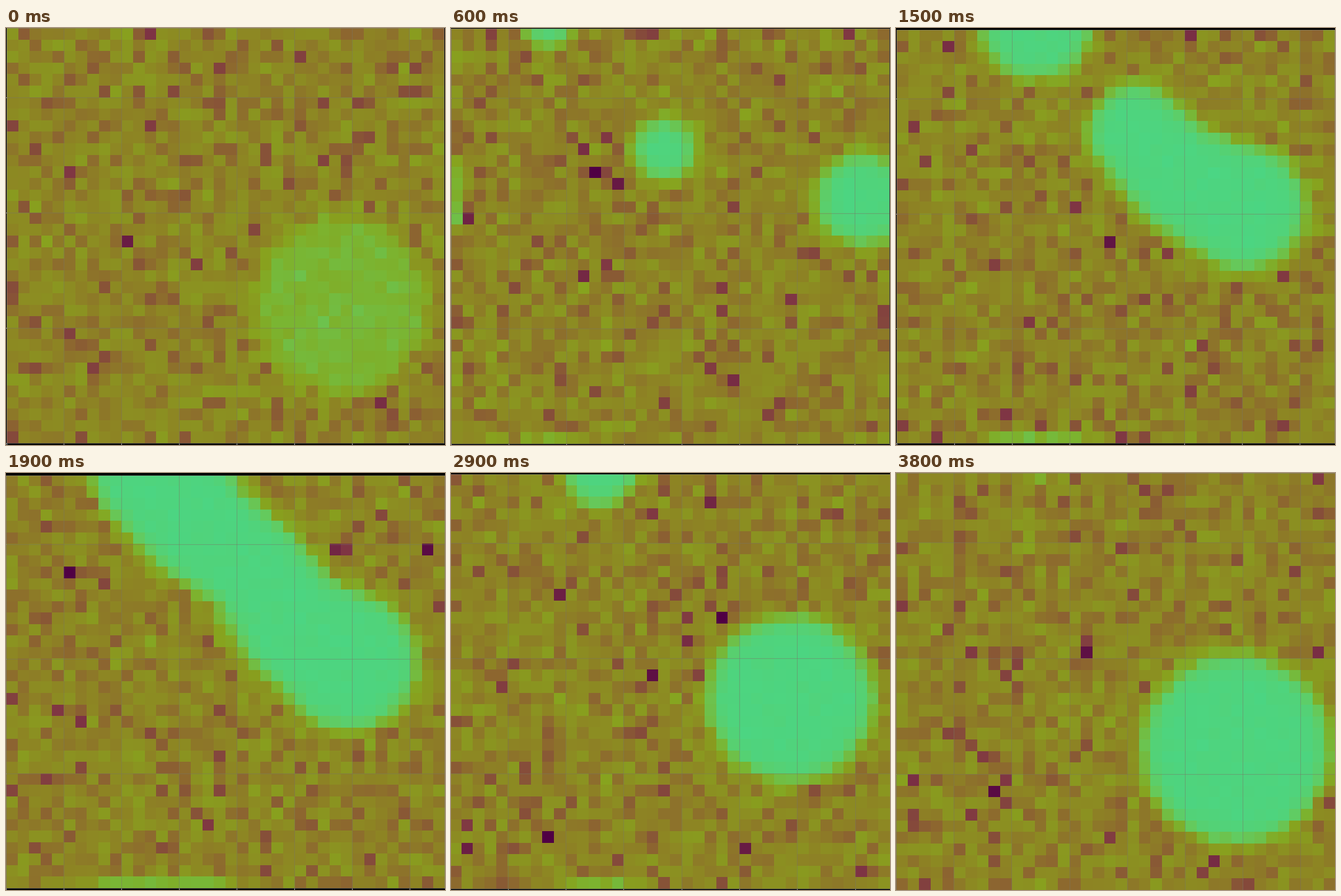
Recreate the animation shown at these times as a matplotlib script. Size 708x673 px, loop 3.9 s.

```python
import numpy as np
import matplotlib.pyplot as plt
from matplotlib.animation import FuncAnimation
from matplotlib.colors import LinearSegmentedColormap

W, H, DPI = 708, 673, 100
COLS, ROWS = 38, 36
FRAMES, STEP_MS = 39, 100
SPLIT = 6         # frame at which the opening disc has become separate drops
SAG = np.array([-0.7, 0.8])
LEAK = 0.25

# Colour against log10 of signal power.
STOPS = [
    (-3.3, (80, 0, 68)), (-2.2, (128, 54, 68)), (-1.0, (141, 102, 48)),
    (-0.15, (142, 132, 36)), (0.8, (136, 163, 30)), (1.4, (124, 180, 48)),
    (2.0, (100, 203, 95)), (2.7, (75, 214, 132)),
]
LOW, HIGH = STOPS[0][0], STOPS[-1][0]
CMAP = LinearSegmentedColormap.from_list(
    "power",
    [((v - LOW) / (HIGH - LOW), tuple(c / 255 for c in rgb)) for v, rgb in STOPS],
    N=512)

X, Y = np.meshgrid(np.arange(COLS) + 0.5, np.arange(ROWS) + 0.5)


def lerp(a, b, k):
    return a + (b - a) * k


def ease(t, start, end):
    k = np.clip((t - start) / (end - start), 0, 1)
    return k * k * (3 - 2 * k)


def capsule(a, b):
    """Soft mask of a capsule between two drops (x, y, radius)."""
    dx, dy, dr = b - a
    s = np.clip(((X - a[0]) * dx + (Y - a[1]) * dy) / (dx * dx + dy * dy + 1e-9), 0, 1)
    dist = np.hypot(X - a[0] - s * dx, Y - a[1] - s * dy)
    return 1 / (1 + np.exp(-2.2 * (a[2] + s * dr - 0.5 - dist)))


def bridge(a, b, openness):
    """Two drops joined by a slightly sagging neck that can pinch off."""
    neck = (a + b) / 2
    neck[:2] += SAG * openness
    neck[2] = lerp(-12, 0.97 * neck[2], openness)
    return np.maximum.reduce(
        [capsule(a, a), capsule(b, b), capsule(a, neck), capsule(neck, b)])


def main_drop(t):
    """Swings in from the right, then sinks and grows."""
    u = max(t - SPLIT, 0)
    k = u / (FRAMES - 1 - SPLIT)
    sink = max(t - 9, 0) / 29
    drop = np.array([29.4 + 6.2 * np.exp(-u / 4),
                     14.9 + 8.9 * sink ** 1.75,
                     4 + 4.2 * k ** 0.8])
    return lerp(np.array([29, 24, 8]), drop, ease(t, 0, SPLIT))


def top_drop(t):
    """Swells and shrinks on the top edge while drifting right."""
    u = t - SPLIT
    return np.array([13.5 - 5 * np.exp(-(u / 8) ** 2), -0.6, 6 - 0.3 * abs(t - 18.5)])


def middle_drop(t, top):
    """Grows on its own, then is pulled into the top drop."""
    u = t - SPLIT
    free = np.array([18.5 + 0.25 * u, 10.5 - 0.17 * u, 4.8 - 2.1 * np.exp(-u / 7)])
    return lerp(free, top, ease(t, 18, 26))


def shape(t):
    main, top = main_drop(t), top_drop(t)
    middle = middle_drop(t, top)
    mask = np.maximum(
        bridge(top, middle, ease(t, 13, 18)),
        bridge(middle, main, ease(t, 7, 10.5) * (1 - ease(t, 19, 23))))
    # The blur leaks one cell across the opposite edges.
    mask[-1] = np.maximum(mask[-1], LEAK * mask[0])
    mask[:, 0] = np.maximum(mask[:, 0], LEAK * mask[:, -1])
    return mask


def field(t):
    rng = np.random.default_rng(100 + t)
    re, im = rng.normal(0, np.sqrt(0.5), (2, ROWS, COLS))
    gain = 20 * lerp(0.26, 1, min(t / 2, 1))
    return np.log10((gain * shape(t) + re) ** 2 + im ** 2 + 1e-6)


fig = plt.figure(figsize=(W / DPI, H / DPI), dpi=DPI, facecolor="black")
ax = fig.add_axes([0, 0, 1, 1])
image = ax.imshow(np.zeros((ROWS, COLS)), cmap=CMAP, vmin=LOW, vmax=HIGH,
                  extent=(0, COLS, ROWS, 0), aspect="auto", interpolation="nearest")
ax.set(xlim=(0, COLS), ylim=(ROWS, 0),
       xticks=range(0, COLS, 5), yticks=range(6, ROWS + 1, 10))
ax.set_axisbelow(False)
ax.grid(color=(0.48, 0.46, 0.40), alpha=0.45, linewidth=0.8)
ax.tick_params(color="0.65", labelbottom=False, labelleft=False)
for spine in ax.spines.values():
    spine.set(color="0.5", linewidth=0.6, alpha=0.6)


def update(t):
    # The plot's edges wobble by a few pixels in every frame.
    rng = np.random.default_rng(t)
    left, top, right, bottom = rng.uniform([-2, -1, 706, 670], [2, 4, 709, 674])
    ax.set_position([left / W, 1 - bottom / H, (right - left) / W, (bottom - top) / H])
    image.set_data(field(t))
    return [image]


anim = FuncAnimation(fig, update, frames=FRAMES, interval=STEP_MS,
                     repeat=True, repeat_delay=0, blit=False)
plt.show()
```
